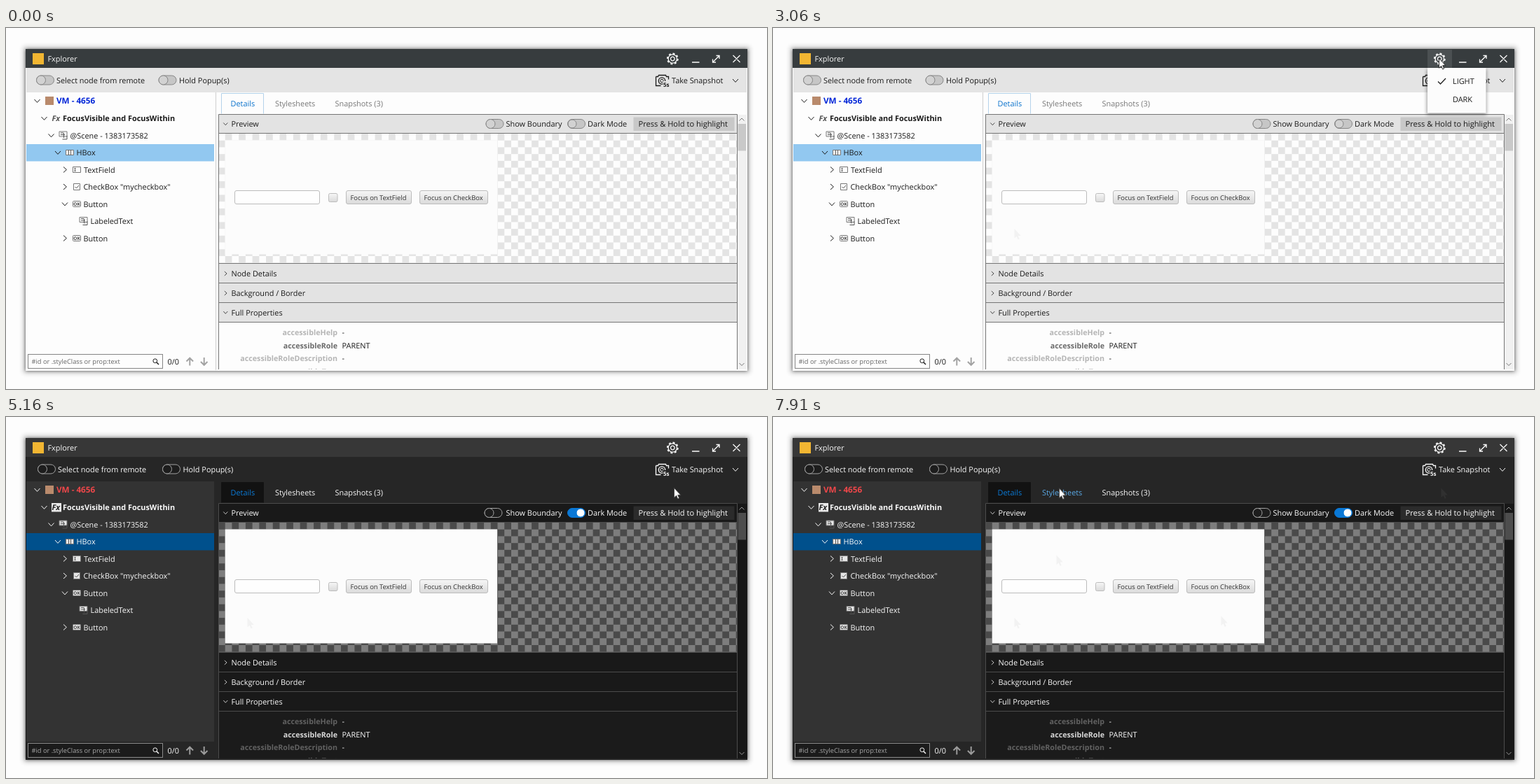
Animation of 1086x516 px, one loop 7.99 s. Source, as an HTML page:

```html
<!DOCTYPE html>
<html lang="en">
<head>
<meta charset="utf-8">
<title>Fxplorer</title>
<style>
html, body { margin: 0; width: 100%; height: 100%; overflow: hidden; background: #fdfdfd; }
svg { display: block; }

#stage {
  --title: #373c3e; --bar: #e4e4e4; --tree: #fdfdfd; --foot: #fdfdfd; --panel: #fdfdfd; --edge: #fdfdfd;
  --split: #cfcfcf; --ink: #1a1a1a; --vm: #0026d8; --sel: #92c8f0; --tab: #fdfdfd; --tabline: #b4d3ea;
  --tab2: #777; --tab3: #777; --link: #0a72cc; --head: #e3e3e3; --head1: #e3e3e3; --line: #757575;
  --btn: #c8c8c8; --btnline: transparent; --tile: #fdfdfd; --tile2: #e4e4e4; --props: #fdfdfd;
  --dim: #b5b5b5; --key: #6a6a6a; --track: #f1f1f1; --thumb: #c9c9c9; --arrow: #777;
  --off: #c6c6c6; --offline: #878787; --knob: #d2d2d2; --dark: #c6c6c6; --darkline: #878787; --darkknob: #d2d2d2;
  --darkx: 0px; --field: #fdfdfd; --fieldline: #858585; --hint: #666; --nav: #a3a3a3; --mini: #fdfdfd;
  --fx: transparent; --fxink: #555; --cursor: #222;
  --s1: 0px; --s2: 0px; --s3: 0px;
  --gear: 0; --pop: 0; --i1: 0; --i2: 0; --g1: 0; --g2: 0; --g3: 0; --g4: 0;
  font: 10.9px "Open Sans", "Noto Sans", sans-serif;
  text-rendering: geometricPrecision;
  animation: scene 7990ms step-end infinite;
}
@keyframes scene {
  8.44% { --g1: 1; }
  16.26% { --tab2: #0a72cc; }
  17.26% { --tab2: #777; }
  37.41% { --gear: .1; }
  38.28% { --pop: 1; }
  47.05% { --gear: 0; --i1: 1; }
  49.05% { --i1: 0; --i2: 1; }
  53.93% { --i2: 1.8; }
  55.81% { --i2: 1; }
  58.94% { --pop: 0; --i2: 0; }
  64.57% {
    --title: #373737; --bar: #262626; --tree: #333; --foot: #262626; --panel: #262626; --edge: #1d1d1d;
    --split: #262626; --ink: #fafafa; --vm: #f0474a; --sel: #00508c; --tab: #121212; --tabline: #121212;
    --tab2: #fafafa; --tab3: #fafafa; --link: #0a7ad6; --head: #191919; --head1: #191919; --line: #4c4c4c;
    --btn: #2b2b2b; --tile: #4a4a4a; --tile2: #7d7d7d; --props: #1b1b1b;
    --dim: #626262; --key: #d8d8d8; --track: #171717; --thumb: #4d4d4d; --arrow: #999;
    --off: #1d1d1d; --offline: #a2a2a2; --knob: #1d1d1d; --dark: #0a78d6; --darkline: #0a78d6; --darkknob: #fff;
    --darkx: 12px; --field: #1b1b1b; --fieldline: #8a8a8a; --hint: #a8a8a8; --nav: #9b9b9b; --mini: #e6e6e6;
    --fx: #e9e9e9; --fxink: #222; --cursor: #444;
    --s1: 2px; --s2: 5.5px; --s3: -2px;
  }
  86.35% { --s3: 0px; --head1: #484848; --btn: #1c1c1c; --btnline: #bdbdbd; --g4: 1; }
  87.48% { --head1: #191919; --btn: #2b2b2b; --btnline: transparent; }
  89.48% { --g2: 1; }
  91.36% { --g3: 1; }
  94.24% { --tab2: #5aa9e6; }
}

/* Each leg names its number of jumps; legs without one hold. */
#cursor { opacity: 0; animation: move 7990ms step-end infinite; }
@keyframes move {
  0% { opacity: 0; transform: translate(943px, 488px); }
  5.5% { opacity: 1; transform: translate(943px, 488px); animation-timing-function: steps(3); }
  8.44% { transform: translate(343px, 287px); }
  9.44% { transform: translate(333px, 233px); animation-timing-function: steps(3); }
  12.38% { transform: translate(321px, 92px); }
  14.38% { transform: translate(318px, 92px); }
  16.26% { transform: translate(385px, 94px); }
  17.26% { transform: translate(461px, 53px); animation-timing-function: steps(4); }
  21.02% { transform: translate(870px, 74px); animation-timing-function: steps(5); }
  26.02% { transform: translate(1055px, 81px); }
  28.9% { transform: translate(1030px, 72px); animation-timing-function: steps(3); }
  31.72% { transform: translate(912px, 60px); animation-timing-function: steps(3); }
  34.53% { transform: translate(950px, 43px); }
  47.05% { transform: translate(950px, 61px); animation-timing-function: steps(3); }
  49.93% { transform: translate(953px, 101px); }
  86.35% { transform: translate(898px, 178px); animation-timing-function: steps(2); }
  88.48% { transform: translate(740px, 316px); }
  89.48% { transform: translate(640px, 285px); animation-timing-function: steps(2); }
  91.36% { transform: translate(405px, 198px); animation-timing-function: steps(4); }
  95.24% { opacity: 1; transform: translate(408px, 101.5px); }
  100% { opacity: 1; transform: translate(408px, 101.5px); }
}

text { fill: var(--ink); }
.b { font-weight: 700; }
.w { fill: #fafafa; }
.s { font-size: 9.4px; fill: #333; }
.line { fill: none; stroke: var(--ink); }
.white { fill: none; stroke: #fafafa; stroke-width: 1.3; }
.thin { fill: none; stroke: var(--line); }
.props text { font-size: 10.7px; fill: var(--dim); }
.props .v { font-size: 10.9px; fill: var(--ink); }
.mini { fill: var(--mini); stroke: #777; }
.glyph { fill: none; stroke: #555; }
.off { fill: var(--off); stroke: var(--offline); }
.knob { fill: var(--knob); stroke: var(--offline); }
.shift1 { transform: translateX(var(--s1)); }
.shift2 { transform: translateX(var(--s2)); }
.shift3 { transform: translateX(var(--s3)); }
</style>
</head>
<body>
<svg id="stage" width="1086" height="516" viewBox="0 0 1086 516">
  <defs>
    <filter id="soft" x="-20%" y="-20%" width="140%" height="140%"><feGaussianBlur stdDeviation="2.4"/></filter>
    <pattern id="tiles" x="303" y="151" width="19.44" height="19.44" patternUnits="userSpaceOnUse">
      <path fill="var(--tile2)" d="M9.72 0h9.72v9.72h-19.44v9.72h9.72z"/>
    </pattern>
    <linearGradient id="face" x2="0" y2="1"><stop stop-color="#f6f6f6"/><stop offset="1" stop-color="#dadada"/></linearGradient>
    <clipPath id="view"><path d="M303 421h741v67H303z"/></clipPath>
    <path id="arrow" d="M.5 .5V14.2L3.6 11.3 5.7 16 7.7 15.1 5.7 10.6H9.8Z"/>
    <path id="down" class="line" d="M-4-2 0 2.4 4-2"/>
    <path id="right" class="line" d="M-2-4 2.4 0-2 4"/>
    <g id="toggle">
      <rect class="off" x=".5" y="-6.5" width="25" height="13" rx="6.5"/>
      <circle class="knob" cx="7" r="6.5"/>
    </g>
    <g id="scene-icon">
      <path class="mini" d="M-5.5-5.5h11v7h-11z"/>
      <path class="glyph" d="M-3.5-3.5h4M-3.5-1h6M1-3.5v7M-1 5.5h6.5v-5"/>
    </g>
    <g id="ok-icon">
      <rect class="mini" x="-5.5" y="-4" width="11" height="8" rx="1"/>
      <text class="b" x="0" y="2.5" text-anchor="middle" style="font-size:6.5px;fill:#444">OK</text>
    </g>
  </defs>

  <!-- Window frame -->
  <rect x="22" y="24" width="1042" height="472" rx="7" fill="#000" opacity=".09" filter="url(#soft)"/>
  <rect x="28" y="30.5" width="1030" height="459.5" fill="#000" opacity=".7" filter="url(#soft)"/>
  <path fill="var(--edge)" d="M28 30h1030v460H28z"/>
  <path fill="var(--panel)" d="M29 31h1028v458H29z"/>
  <path fill="var(--title)" d="M28 30h1030v27H28z"/>
  <rect x="38" y="36" width="16" height="16" fill="#f2b632"/>
  <text class="w" x="59.5" y="48">Fxplorer</text>
  <rect x="934" y="31" width="35" height="26" fill="#fff" style="opacity:var(--gear)"/>
  <g class="white" transform="translate(951.3 44)">
    <circle r="6.2"/><circle r="2.8"/>
    <circle r="7.4" stroke-width="2" stroke-dasharray="2.9 2.91"/>
  </g>
  <path class="white" d="M979 49h10.500M1008.500 49 1018 39.500M1013.500 39.500h4.500V44M1008.500 44.500V49h4.500M1037.500 39l10 10M1047.500 39l-10 10"/>

  <!-- Toolbar -->
  <path fill="var(--bar)" d="M29 57h1028v35H29z"/>
  <g class="shift1"><use href="#toggle" x="43" y="74.500"/><text x="72" y="78.500">Select node from remote</text></g>
  <g class="shift2"><use href="#toggle" x="217.500" y="74.500"/><text x="247" y="78.500">Hold Popup(s)</text></g>
  <g class="line">
    <path d="M927.500 69.500h3l1-2h10l1 2h3v4M927.500 69.500v13h7" stroke-width="1.3"/>
    <circle cx="936" cy="75.500" r="4.700" stroke-width="1.3"/><circle cx="936" cy="75.500" r="2.200"/>
  </g>
  <path fill="var(--bar)" d="M937.500 76h10v9h-10z"/>
  <text class="b" x="938" y="83.500" style="font-size:8px">5s</text>
  <text x="950" y="78.500">Take Snapshot</text>
  <use href="#down" x="1041" y="75"/>

  <!-- Node tree -->
  <path fill="var(--tree)" d="M29 92h268v372H29z"/>
  <path fill="var(--foot)" d="M29 464h268v25H29z"/>
  <path fill="var(--split)" d="M299 92h1v397h-1z"/>
  <path fill="var(--sel)" d="M29 166h268v24.500H29z"/>
  <use href="#down" x="44.500" y="104"/>
  <use href="#down" x="54.500" y="129"/>
  <use href="#down" x="64.500" y="153.500"/>
  <use href="#down" x="74" y="178"/>
  <use href="#right" x="84" y="202.500"/>
  <use href="#right" x="84" y="227"/>
  <use href="#down" x="84" y="251.500"/>
  <use href="#right" x="84" y="300.500"/>
  <rect x="56" y="98" width="12" height="12" fill="#b98a6c"/>
  <rect x="65" y="123" width="14" height="12.500" fill="var(--fx)"/>
  <text class="b" x="65.500" y="133" style="font-style:italic;fill:var(--fxink)">Fx</text>
  <use href="#scene-icon" x="81.500" y="153.500"/>
  <use href="#scene-icon" x="110.500" y="276"/>
  <path class="mini" d="M85.500 174.500h11v7h-11z"/><path class="glyph" d="M89.500 174.500v7M92.500 174.500v7"/>
  <path class="mini" d="M95.500 198.500h11v8h-11z"/><path class="glyph" d="M98.500 200v5M97.500 200.500h2M97.500 204.500h2"/>
  <path class="mini" d="M96.500 222.500h9v9h-9z"/><path class="glyph" d="M98.500 227l2 2 3.500-4"/>
  <use href="#ok-icon" x="101" y="251.500"/>
  <use href="#ok-icon" x="101" y="300.500"/>
  <text class="b" x="72" y="108.300" style="font-size:11.700px;fill:var(--vm)">VM - 4656</text>
  <text class="b" x="81" y="133">FocusVisible and FocusWithin</text>
  <text x="91.500" y="157.500">@Scene - 1383173582</text>
  <text x="100.500" y="182">HBox</text>
  <text x="111" y="206.500">TextField</text>
  <text x="110.500" y="231">CheckBox "mycheckbox"</text>
  <text x="110.500" y="255.500">Button</text>
  <text x="120.500" y="280">LabeledText</text>
  <text x="110.500" y="304.500">Button</text>
  <rect x="31.500" y="466.500" width="192" height="20" fill="var(--field)" stroke="var(--fieldline)"/>
  <text x="36.500" y="480" style="font-size:9.250px;fill:var(--hint)">#id or .styleClass or prop:text</text>
  <g class="line"><circle cx="212.800" cy="475.800" r="2.900"/><path d="M215 478l3 3" stroke-width="1.400"/></g>
  <text x="230.500" y="480.500">0/0</text>
  <path fill="none" stroke="var(--nav)" stroke-width="2" d="M262.300 482.500v-10M257.500 476.500l4.800-4.800 4.800 4.800M282.700 471v10M277.900 477l4.800 4.800 4.800-4.800"/>

  <!-- Tabs -->
  <path fill="var(--tab)" stroke="var(--tabline)" d="M307.500 122.500v-29h60v29"/>
  <text x="320.500" y="111.500" style="fill:var(--link)">Details</text>
  <text x="384" y="111.500" style="fill:var(--tab2)">Stylesheets</text>
  <text x="469.500" y="111.500" style="fill:var(--tab3)">Snapshots (3)</text>

  <!-- Details -->
  <path fill="var(--head1)" d="M303 123h741v28H303z"/>
  <path fill="var(--tile)" d="M303 151h741v186H303z"/>
  <path fill="url(#tiles)" d="M303 151h741v186H303z"/>
  <path fill="var(--head)" d="M303 337h741v84H303z"/>
  <path fill="var(--props)" d="M303 421h741v67H303z"/>
  <path class="thin" d="M303.500 488V123.500h740V488M303 150.500h741M303 336.500h741M303 364.500h741M303 392.500h741M303 420.500h741"/>
  <use href="#down" transform="translate(313.300 137) scale(.75)"/>
  <use href="#right" transform="translate(313.300 351) scale(.75)"/>
  <use href="#right" transform="translate(313.300 379) scale(.75)"/>
  <use href="#down" transform="translate(313.300 406.500) scale(.75)"/>
  <text x="321.500" y="141">Preview</text>
  <text x="321.500" y="355">Node Details</text>
  <text x="321.500" y="383">Background / Border</text>
  <text x="321.500" y="410.500">Full Properties</text>
  <use class="shift3" href="#toggle" x="684.500" y="137"/>
  <text x="713.500" y="141">Show Boundary</text>
  <rect x="801.500" y="130.500" width="25" height="13" rx="6.500" fill="var(--dark)" stroke="var(--darkline)"/>
  <circle cx="808" cy="137" r="6" fill="var(--darkknob)" stroke="var(--darkline)" style="transform:translateX(var(--darkx))"/>
  <text x="830" y="141">Dark Mode</text>
  <rect x="895.500" y="127.500" width="144" height="19.500" fill="var(--btn)" stroke="var(--btnline)" stroke-width="1.500"/>
  <text x="902.500" y="141" style="font-size:11.100px">Press &amp; Hold to highlight</text>

  <path fill="#fcfcfc" d="M312.700 160.500H701v163H312.700z"/>
  <g stroke="#bcbcbc">
    <rect x="326.500" y="232.500" width="121" height="19" rx="2.500" fill="#fefefe"/>
    <rect x="460.500" y="236.500" width="12.500" height="12" rx="2" fill="url(#face)"/>
    <rect x="485.500" y="232.500" width="93" height="19" rx="2.500" fill="url(#face)"/>
    <rect x="590.500" y="232.500" width="97" height="19" rx="2.500" fill="url(#face)"/>
  </g>
  <text class="s" x="491.500" y="246">Focus on TextField</text>
  <text class="s" x="596.500" y="246">Focus on CheckBox</text>
  <g fill="#f2f2f2">
    <use href="#arrow" x="344" y="286.500" style="opacity:var(--g1)"/>
    <use href="#arrow" x="639" y="284" style="opacity:var(--g2)"/>
    <use href="#arrow" x="404" y="197" style="opacity:var(--g3)"/>
    <use href="#arrow" x="953" y="101" fill="#303030" style="opacity:var(--g4)"/>
  </g>

  <g class="props" clip-path="url(#view)">
    <g class="b" text-anchor="end">
      <text x="473" y="438.500">accessibleHelp</text>
      <text x="473" y="457.500" style="fill:var(--key)">accessibleRole</text>
      <text x="473" y="476">accessibleRoleDescription</text>
      <text x="473" y="494.500">accessibleText</text>
    </g>
    <text class="v" x="479.500" y="438.500">-</text>
    <text class="v" x="479.500" y="457.500">PARENT</text>
    <text class="v" x="479.500" y="476">-</text>
  </g>

  <!-- Scroll bar -->
  <path fill="var(--track)" d="M1044 124h13v364h-13z"/>
  <path fill="var(--thumb)" d="M1044.500 137h11.500v38.500h-11.500z"/>
  <path fill="none" stroke="var(--arrow)" d="M1046.500 132.500l3.500-3.500 3.500 3.500M1046.500 479l3.500 3.500 3.500-3.500"/>

  <!-- Theme menu -->
  <g style="opacity:var(--pop)">
    <rect x="933" y="59" width="85" height="65" fill="#000" opacity=".4" filter="url(#soft)"/>
    <path fill="#fcfcfc" d="M934 57h83.500v64.500H934z"/>
    <path fill="#000" fill-opacity=".09" style="opacity:var(--i1)" d="M934 63h83.500v26H934z"/>
    <path fill="#000" style="fill-opacity:calc(var(--i2) * .09)" d="M934 89h83.500v26H934z"/>
    <path fill="none" stroke="#222" stroke-width="1.300" d="M949 76.500l3.500 3.500 7.500-8"/>
    <text x="970" y="80" style="fill:#1a1a1a">LIGHT</text>
    <text x="970" y="106" style="fill:#1a1a1a">DARK</text>
  </g>

  <g id="cursor"><use href="#arrow" fill="#fff" stroke="var(--cursor)" stroke-width=".9"/></g>
</svg>
</body>
</html>
```
